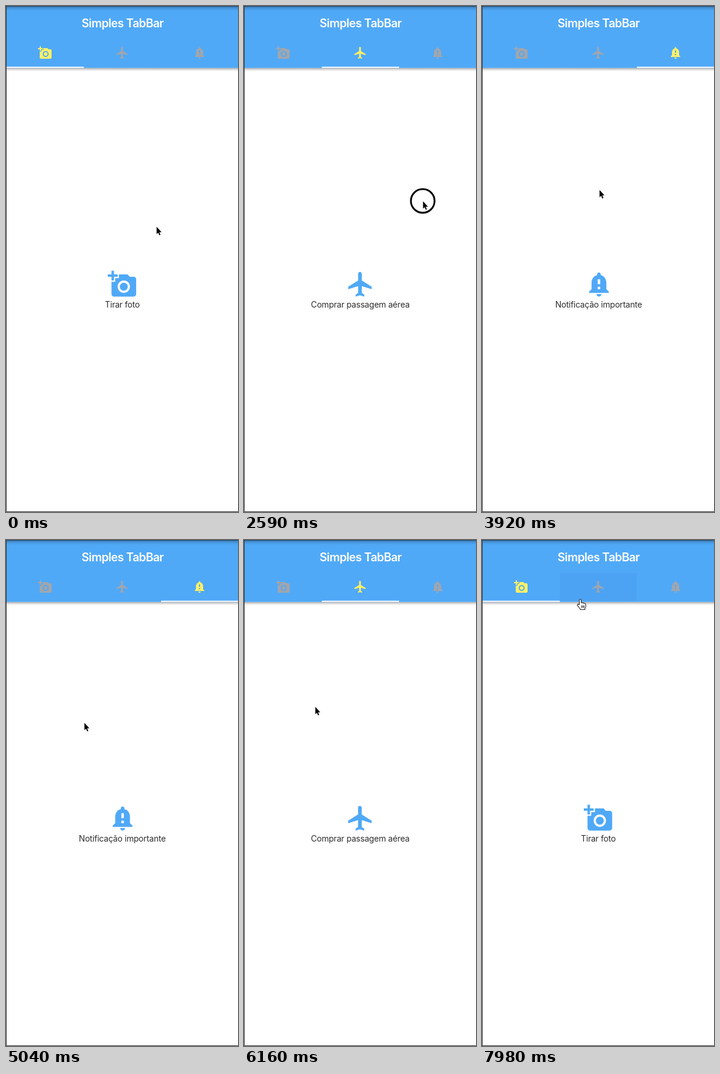
Recreate the animation shown at these times as an HTML page. Size 392x854 px, loop 8000 ms.

```html
<!DOCTYPE html>
<html lang="pt">
<head>
<meta charset="utf-8">
<title>Simples TabBar</title>
<style>
  html, body { margin: 0; width: 100%; height: 100%; overflow: hidden; background: #fff; }
  svg { display: block; width: 392px; height: 854px; }
  text { font-family: Inter, "Open Sans", sans-serif; text-anchor: middle; }
  .title { font-size: 19.5px; font-weight: 600; letter-spacing: -.56px; fill: #fff; }
  .label { font-size: 14px; letter-spacing: -.2px; fill: #2e2e2e; }
</style>
</head>
<body>
<svg viewBox="0 0 392 854">
  <defs>
    <linearGradient id="shade" x2="0" y2="1">
      <stop stop-color="#000" stop-opacity=".4"/>
      <stop offset=".4" stop-color="#000" stop-opacity=".14"/>
      <stop offset="1" stop-color="#000" stop-opacity="0"/>
    </linearGradient>
    <path id="camera" d="M3 4V1h2v3h3v2H5v3H3V6H0V4h3zm3 6V7h3V4h7l1.83 2H21c1.1 0 2 .9 2 2v12c0 1.1-.9 2-2 2H5c-1.1 0-2-.9-2-2V10h3zm7 9c2.76 0 5-2.24 5-5s-2.24-5-5-5-5 2.24-5 5 2.24 5 5 5zm-3.2-5c0 1.77 1.43 3.2 3.2 3.2s3.2-1.43 3.2-3.2-1.43-3.2-3.2-3.2-3.2 1.43-3.2 3.2z"/>
    <path id="plane" d="M21 16v-2l-8-5V3.5c0-.83-.67-1.5-1.5-1.5S10 2.67 10 3.5V9l-8 5v2l8-2.5V19l-2 1.5V22l3.5-1 3.5 1v-1.5L13 19v-5.5l8 2.5z"/>
    <path id="bell" d="M18 16v-5c0-3.07-1.64-5.64-4.5-6.32V4c0-.83-.67-1.5-1.5-1.5s-1.5.67-1.5 1.5v.68C7.63 5.36 6 7.92 6 11v5l-2 2v1h16v-1l-2-2zm-5 0h-2v-2h2v2zm0-4h-2V8h2v4zm-1 10c1.1 0 2-.9 2-2h-4c0 1.1.89 2 2 2z"/>
  </defs>
  <rect width="392" height="854" fill="#fff"/>
  <g id="pages"></g>
  <rect y="104.5" width="392" height="6" fill="url(#shade)"/>
  <rect width="392" height="104.5" fill="#50a9f7"/>
  <rect width="392" height="8" fill="url(#shade)"/>
  <path d="M.5 0V853.5H392" fill="none" stroke="#333"/>
  <path d="M0 .5H392" stroke="#000" opacity=".3"/>
  <rect id="hover" x="131.5" y="56" width="130" height="46.5" fill="#2040a0" opacity=".06"/>
  <text class="title" x="197" y="36">Simples TabBar</text>
  <g id="tabs"></g>
  <rect id="bar" y="102.5" width="130.5" height="2" fill="#fff"/>
  <circle id="ring" r="20" fill="none" stroke="#000" stroke-width="3"/>
  <path id="arrow" d="M.5 .6V13L3.2 10.5 5.2 15.1 7 14.3 5.1 9.7H8.8Z" stroke="#fff" stroke-width="1.2" paint-order="stroke"/>
  <path id="hand" fill="#fff" stroke="#222" stroke-width="1.1" stroke-linejoin="round"
    d="M-1.5 9V1.3Q-1.3 0 0 0T1.6 1.3V6Q3.3 4.9 4.3 6.4 6 5.6 6.9 7 9.3 6.8 9.3 9V12Q9.2 14 7.8 15.5V17.5H.3Q-.2 15.5-2 13.8L-4.8 10.4Q-5.3 8.6-3.6 8.4Q-2.4 8.3-1.5 9.5M2.3 10.5V14.5M4.4 10.5V14.5M6.4 10.5V14.5"/>
</svg>
<script>
const LOOP = 8000, WIDTH = 392, TAB = 130.5, SLOP = 6;
const YELLOW = [253, 240, 102], GREY = [163, 166, 171];
const tabs = [
  ['camera', 'Tirar foto'],
  ['plane', 'Comprar passagem aérea'],
  ['bell', 'Notificação importante']
];

// The pointer rests between moves; a move with a page is a swipe to that page.
const moves = [
  { from: 0, to: 0, x: 254, y: 372 },
  { from: 70, to: 450, x: 47, y: 335, page: 1 },
  { from: 980, to: 1470, x: 272, y: 340 },
  { from: 1820, to: 1960, x: 302, y: 329 },
  { from: 2590, to: 3360, x: 79, y: 307, page: 2 },
  { from: 3430, to: 4340, x: 292, y: 312 },
  { from: 4620, to: 5040, x: 132, y: 308 },
  { from: 5110, to: 5480, x: 340, y: 300, page: 1 },
  { from: 5680, to: 6160, x: 120, y: 281 },
  { from: 6590, to: 6960, x: 320, y: 275, page: 0 },
  { from: 7030, to: 7960, x: 166, y: 100 }
];

const $ = id => document.getElementById(id);
const mix = (a, b, k) => a + (b - a) * k;
const ease = k => k * k * (3 - 2 * k);

function pointer(t) {
  const i = Math.max(1, moves.findLastIndex(m => t >= m.from));
  const a = moves[i - 1], b = moves[i];
  const k = ease(Math.min(1, Math.max(0, (t - b.from) / (b.to - b.from))));
  return [mix(a.x, b.x, k), mix(a.y, b.y, k)];
}

// Follow the finger, then settle like a critically damped spring.
function pagePosition(t) {
  let page = 0, p = 0;
  for (const m of moves) {
    if (m.page === undefined || t < m.from) continue;
    const dx = pointer(Math.min(t, m.to))[0] - pointer(m.from)[0];
    const slop = Math.sign(dx) * Math.min(Math.abs(dx), SLOP);
    const s = Math.max(0, t - m.to) * 0.014;
    p = mix(m.page, page - (dx - slop) / WIDTH, (1 + s) * Math.exp(-s));
    page = m.page;
  }
  return p;
}

$('pages').innerHTML = tabs.map(([icon, label]) => `<g>
  <use href="#${icon}" transform="translate(172 444.6) scale(2.0833)" fill="#50a9f7"/>
  <text class="label" x="196.5" y="509">${label}</text></g>`).join('');
$('tabs').innerHTML = tabs.map(([icon], i) => `<use href="#${icon}" x="${54 + TAB * i}" y="67"/>`).join('');

const move = (el, x, y) => el.setAttribute('transform', `translate(${x} ${y})`);
const show = (el, on) => el.setAttribute('visibility', on ? 'visible' : 'hidden');

function draw(t) {
  const p = pagePosition(t), [x, y] = pointer(t), onTab = y < 104;
  tabs.forEach((_, i) => {
    move($('pages').children[i], (i - p) * WIDTH, 0);
    const k = Math.max(0, 1 - Math.abs(i - p));
    $('tabs').children[i].setAttribute('fill', `rgb(${GREY.map((g, c) => mix(g, YELLOW[c], k))})`);
  });
  $('bar').setAttribute('x', 1 + TAB * p);
  for (const id of ['ring', 'arrow', 'hand']) move($(id), x, y);
  show($('ring'), moves.some(m => m.page !== undefined && t >= m.from && t < m.to));
  show($('arrow'), !onTab);
  show($('hand'), onTab);
  show($('hover'), onTab);
}

const start = performance.now();
function frame() {
  draw((performance.now() - start) % LOOP);
  requestAnimationFrame(frame);
}
frame();
</script>
</body>
</html>
```
